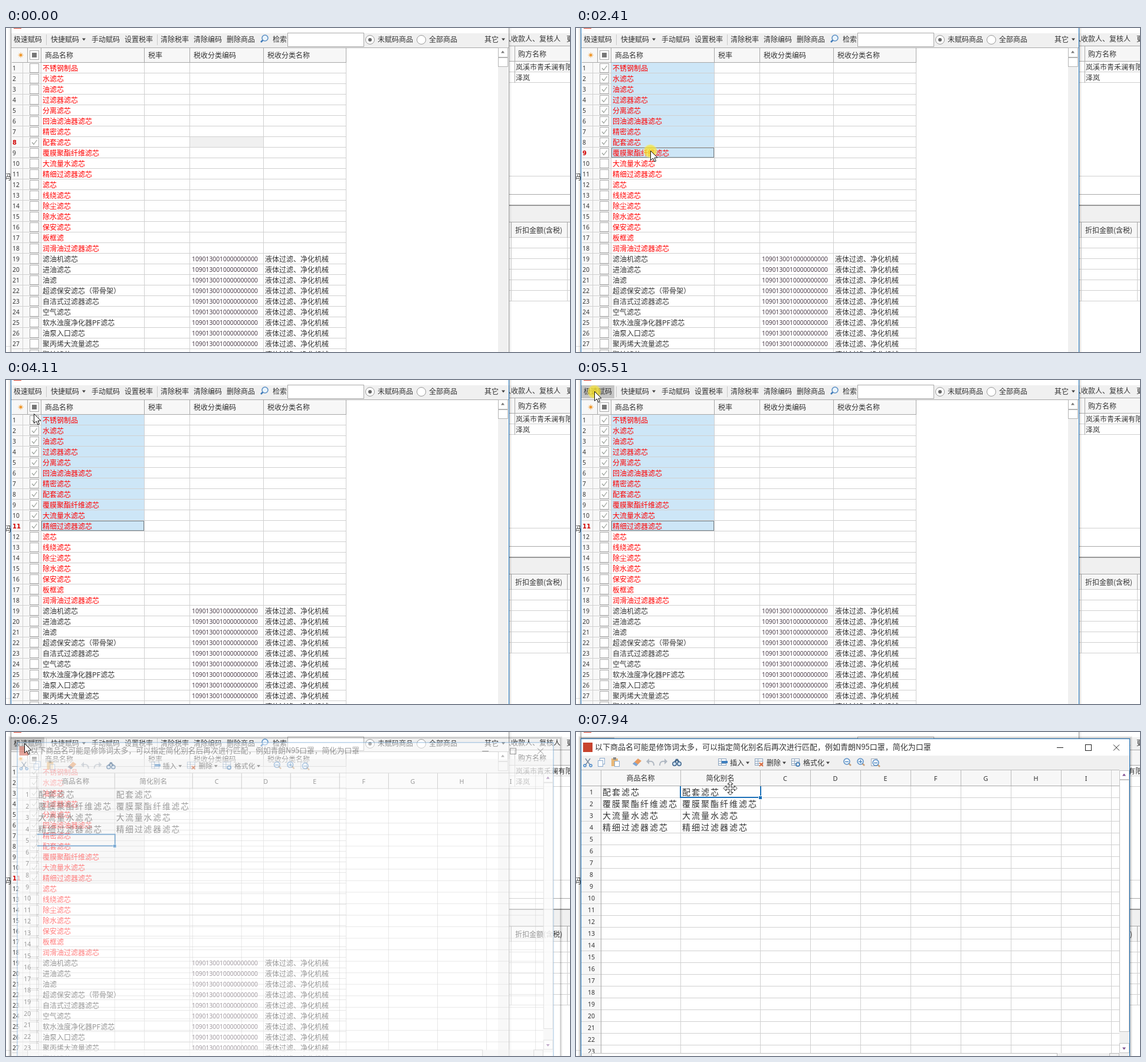
An HTML page with a canvas that plays this animation: 956 by 550 pixels, repeating every 8000 ms.

```html
<!DOCTYPE html>
<html lang="zh">
<head>
<meta charset="utf-8">
<style>
html, body { margin: 0; width: 100%; height: 100%; overflow: hidden; background: #fff; }
canvas { display: block; }
</style>
</head>
<body>
<canvas id="stage" width="956" height="550"></canvas>
<script>
const ctx = document.getElementById('stage').getContext('2d');
const LOOP = 8000;
const CJK = '"Noto Sans CJK SC", "Noto Sans CJK", sans-serif';
const LATIN = '"Noto Sans", sans-serif';
const BLUE = '#1c70b8';
const LINE = '#d0d0d0';
const EDGE = '#a8a8a8';
const INK = '#333';

const goods = ('不锈钢制品 水滤芯 油滤芯 过滤器滤芯 分离滤芯 回油滤油器滤芯 精密滤芯 配套滤芯 覆膜聚酯纤维滤芯 ' +
  '大流量水滤芯 精细过滤器滤芯 滤芯 线绕滤芯 除尘滤芯 除水滤芯 保安滤芯 板框滤 润滑油过滤器滤芯 滤油机滤芯 ' +
  '进油滤芯 油滤 超滤保安滤芯（带骨架） 自洁式过滤器滤芯 空气滤芯 软水浊度净化器PF滤芯 油泵入口滤芯 ' +
  '聚丙烯大流量滤芯 聚结滤芯').split(' ');

// start, end, steps, from, to, ease-out power
const moves = [
  [510, 1200, 11, [862, 537], [120, 77], 2],
  [1330, 1400, 2, [120, 74], [120, 71], 1],
  [1600, 1601, 2, [120, 69], [120, 69], 1],
  [1870, 2410, 9, [120, 69], [126, 208], 1],
  [2480, 2630, 3, [126, 214], [126, 227], 1],
  [2700, 2830, 3, [126, 230], [126, 236], 1],
  [3290, 3430, 3, [126, 238], [126, 243], 1],
  [3760, 4110, 6, [126, 243], [47, 57], 1],
  [4170, 4380, 4, [43, 46], [31, 19], 1.5],
  [6690, 7120, 7, [33, 20], [284, 120], 1.3],
  [7190, 7470, 5, [278, 112], [261, 95], 1.5]
];

function stepAt(t, start, end, count) {
  const k = Math.floor((t - start) / ((end - start) / (count - 1)) + 0.25);
  return Math.max(0, Math.min(count - 1, k));
}

function pointerAt(t) {
  const move = moves.filter(m => t >= m[0]).pop();
  if (!move) return null;
  const [start, end, count, from, to, power] = move;
  const p = 1 - Math.pow(1 - stepAt(t, start, end, count) / (count - 1), power);
  return from.map((v, i) => Math.round(v + (to[i] - v) * p));
}

function box(x, y, w, h, color) {
  ctx.fillStyle = color;
  ctx.fillRect(x, y, w, h);
}
const hline = (x1, x2, y, color = LINE) => box(x1, y, x2 - x1, 1, color);
const vline = (x, y1, y2, color = LINE) => box(x, y1, 1, y2 - y1, color);

function frame(x, y, w, h, color, width = 1) {
  ctx.strokeStyle = color;
  ctx.lineWidth = width;
  ctx.strokeRect(x + 0.5, y + 0.5, w - 1, h - 1);
}

// Baselines sit on whole pixels to keep small text crisp.
function text(str, x, cy, { size = 12, color = INK, font = CJK, align = 'left', bold = false, gap = 0 } = {}) {
  ctx.font = `${bold ? 'bold ' : ''}${size}px ${font}`;
  ctx.letterSpacing = gap + 'px';
  ctx.textAlign = align;
  ctx.fillStyle = color;
  ctx.fillText(str, x, Math.round(cy + size * 0.42));
}

function path(points, { fill, stroke, width = 1, close = false } = {}) {
  ctx.beginPath();
  points.forEach(([x, y]) => ctx.lineTo(x, y));
  if (close) ctx.closePath();
  if (fill) { ctx.fillStyle = fill; ctx.fill(); }
  if (stroke) { ctx.strokeStyle = stroke; ctx.lineWidth = width; ctx.stroke(); }
}

function ring(x, y, r, { fill, stroke, width = 1 }) {
  ctx.beginPath();
  ctx.arc(x, y, r, 0, 7);
  if (fill) { ctx.fillStyle = fill; ctx.fill(); }
  if (stroke) { ctx.strokeStyle = stroke; ctx.lineWidth = width; ctx.stroke(); }
}

function triangle(x, y, r = 3, color = '#444', dir = 1) {
  path([[x - r, y - dir * r / 2], [x + r, y - dir * r / 2], [x, y + dir * r / 2 + dir]], { fill: color, close: true });
}

function shadow(x, y, w, h, strength) {
  for (let i = 1; i < 5; i++) frame(x - i, y - i, w + 2 * i, h + 2 * i, `rgba(0,0,0,${strength * (1 - i / 5)})`);
}

function magnifier(x, y, sign) {
  path([[x + 2, y + 2], [x + 7, y + 7]], { stroke: sign ? '#c9a27c' : '#3c78b8', width: 2.5 });
  ring(x, y, 5, { fill: '#eaf4fd', stroke: '#5b8fc4', width: 1.5 });
  if (sign) hline(x - 3, x + 3, y, '#2f6fb0');
  if (sign === '+') vline(x, y - 3, y + 3, '#2f6fb0');
}

function drawBackWindow() {
  box(0, 0, 956, 550, '#fff');
  text('码', -4, 252, { size: 13 });
  hline(0, 8, 540, '#ddd');
  box(853, 9, 103, 22, '#f0f0f0');
  text('入收款人、复核人', 844, 18);
  text('更', 950, 18);
  box(853, 31, 103, 26, '#f6f6f6');
  [30, 56].forEach(y => hline(853, 956, y, EDGE));
  [74, 92, 251].forEach(y => hline(853, 956, y));
  hline(853, 956, 282, EDGE);
  vline(862, 31, 93, EDGE);
  text('购方名称', 868, 44);
  text('岚溪市青禾澜有限', 864, 66);
  text('泽岚', 864, 84);
  box(853, 300, 103, 2, '#999');
  box(853, 302, 103, 28, '#f0f0f0');
  box(853, 330, 103, 26, '#f6f6f6');
  hline(853, 956, 329, EDGE);
  for (let y = 355; y < 470; y += 18) hline(853, 956, y);
  [856, 951].forEach(x => {
    vline(x, 330, 464);
    vline(x, 330, 356, EDGE);
  });
  text('折扣金额(含税)', 863, 343);
}

function radio(x, on) {
  ring(x, 20, 7.5, { fill: '#fff', stroke: '#999' });
  if (on) ring(x, 20, 3, { fill: '#666' });
}

function drawToolbar(hover) {
  box(9, 9, 843, 24, '#f0f0f0');
  if (hover) box(9, 9, 56, 22, '#c4c4c4');
  [['极速赋码', 13], ['快捷赋码', 76], ['手动赋码', 145], ['设置税率', 201], ['清除税率', 262], ['清除编码', 318],
    ['删除商品', 374], ['检索', 452], ['未赋码商品', 630], ['全部商品', 717], ['其它', 811]]
    .forEach(([label, x]) => text(label, x, 19));
  [68, 256].forEach(x => vline(x, 11, 29, '#c8c8c8'));
  [132, 843].forEach(x => triangle(x, 19));
  ctx.save();
  ctx.translate(876, 0);
  ctx.scale(-1, 1);
  magnifier(437, 17);
  ctx.restore();
  box(477, 8, 130, 24, '#fff');
  frame(477, 8, 130, 24, '#aaa');
  radio(617, true);
  radio(704, false);
}

function checkBox(cy, on) {
  box(40, cy - 8, 16, 16, '#fff');
  frame(40, cy - 8, 16, 16, '#aaa');
  if (on) path([[44, cy], [47, cy + 3.5], [52.5, cy - 4]], { stroke: '#9aa09a', width: 1.2 });
}

function drawGoods(selected, active) {
  box(9, 33, 843, 517, '#fff');
  box(10, 34, 567, 25, '#f7f7f7');
  box(10, 59, 49, 491, '#f8f8f8');
  [['商品名称', 66], ['税率', 241], ['税收分类编码', 318], ['税收分类名称', 443]]
    .forEach(([label, x]) => text(label, x, 46));
  for (let i = 0; i < 8; i++) {
    const c = Math.cos(i * Math.PI / 4), s = Math.sin(i * Math.PI / 4);
    path([[25, 46], [25 + 4.5 * c, 46 + 4.5 * s]], { stroke: '#f0a850' });
  }
  ring(25, 46, 2.3, { fill: '#f09a30' });
  checkBox(46, false);
  box(44, 42, 8, 8, '#777');

  const current = selected || 8;
  if (selected) box(60, 59, 174, 18 * selected, active ? '#cde6f7' : '#f0f0f0');
  else box(312, 185, 124, 17, '#f0f0f0');
  for (let y = 76; y < 550; y += 18) hline(10, 577, y);
  [28, 59, 234, 311, 436, 576].forEach(x => vline(x, 59, 550));
  [36, 59, 234, 311, 436, 576].forEach(x => vline(x, 34, 59, EDGE));
  hline(9, 852, 33, EDGE);
  hline(10, 577, 58, EDGE);

  goods.forEach((name, i) => {
    const row = i + 1, cy = 68 + 18 * i;
    const here = row === current;
    text(row, 11, cy, here
      ? { size: 10, color: '#d00000', font: '"DejaVu Sans", sans-serif', bold: true }
      : { size: 10.3, font: LATIN });
    checkBox(cy, selected ? row <= selected : here);
    text(name, 62, cy, { color: row < 19 ? '#f00' : INK });
    if (row > 18) {
      text('1090130010000000000', 315, cy, { size: 10.3, color: '#4a3b48', font: LATIN });
      text('液体过滤、净化机械', 439, cy);
    }
  });
  if (selected && active) {
    ctx.setLineDash([1, 1]);
    frame(60, 59 + 18 * (selected - 1), 174, 17, '#222');
    ctx.setLineDash([]);
  }

  box(834, 34, 17, 516, '#f0f0f0');
  [[33, 17], [50, 16]].forEach(([y, h]) => {
    box(834, y, 17, h, '#fff');
    frame(834, y, 17, h, '#b4b4b4');
  });
  triangle(842, 41, 3, '#777', -1);
}

function drawMainWindow(selected, active, hover) {
  shadow(8, -10, 845, 580, active ? 0.2 : 0.12);
  box(8, 0, 845, 550, '#fff');
  box(13, -12, 13, 13, '#d8402c');
  drawToolbar(hover);
  drawGoods(selected, active);
  const edge = active ? BLUE : '#999';
  vline(8, 0, 550, edge);
  vline(852, 0, 550, edge);
}

function drawDialogIcons() {
  path([[16, 45], [24, 56]], { stroke: '#7a8ba0', width: 1.5 });
  path([[24, 45], [16, 56]], { stroke: '#7a8ba0', width: 1.5 });
  ring(15, 57, 2, { stroke: '#4a88c8', width: 1.5 });
  ring(25, 57, 2, { stroke: '#4a88c8', width: 1.5 });
  [[40, 44], [37, 48]].forEach(([x, y]) => {
    box(x, y, 9, 11, '#fff');
    frame(x, y, 9, 11, '#8aa9cc');
  });
  box(60, 45, 11, 13, '#e8b878');
  box(63, 43, 5, 4, '#888');
  box(65, 49, 9, 10, '#fff');
  frame(65, 49, 9, 10, '#8aa9cc');
  path([[96, 54], [105, 45], [111, 49], [102, 58]], { fill: '#e89a60', close: true });
  path([[96, 54], [99, 51], [105, 55], [102, 58]], { fill: '#7aa8dc', close: true });
  [[126, 1], [148, -1]].forEach(([x, d]) => {
    path([[x - 7 * d, 50], [x - 2 * d, 45], [x - 2 * d, 55]], { fill: '#b0b8c2', close: true });
    ctx.beginPath();
    ctx.moveTo(x - 3 * d, 50);
    ctx.quadraticCurveTo(x + 6 * d, 48, x + 6 * d, 57);
    ctx.strokeStyle = '#b0b8c2';
    ctx.lineWidth = 2;
    ctx.stroke();
  });
  [167, 175].forEach(x => {
    path([[x, 52], [171, 46]], { stroke: '#44698f', width: 3 });
    ring(x, 54, 3.2, { fill: '#cfe2f5', stroke: '#44698f', width: 1.5 });
  });
  [241, 303, 365].forEach((x, i) => {
    box(x, 45, 14, 12, '#fff');
    frame(x, 45, 14, 12, '#8aa2bd');
    [49, 53].forEach(y => hline(x, x + 14, y, '#8aa2bd'));
    vline(x + 5, 45, 57, '#8aa2bd');
    if (i === 0) box(x + 6, 49, 10, 4, '#3d7fc0');
    if (i === 1) {
      path([[x + 8, 52], [x + 14, 58]], { stroke: '#e07040', width: 2 });
      path([[x + 14, 52], [x + 8, 58]], { stroke: '#e07040', width: 2 });
    }
    if (i === 2) ring(x + 11, 55, 3, { fill: '#fff', stroke: '#4a80b5', width: 2 });
  });
  [['插入', 261, 291], ['删除', 323, 353], ['格式化', 385, 427]].forEach(([label, x, arrow]) => {
    text(label, x, 52);
    triangle(arrow, 52);
  });
  magnifier(459, 50, '-');
  magnifier(482, 50, '+');
  box(500, 45, 11, 13, '#fff');
  frame(500, 45, 11, 13, '#9aa8b8');
  magnifier(508, 52, '-');
}

function drawDialogFrame() {
  box(8, 11, 931, 565, '#fff');
  box(12, 18, 16, 16, '#c8442f');
  text('以下商品名可能是修饰词太多，可以指定简化别名后再次进行匹配，例如青朗N95口罩，简化为口罩', 32, 25, { size: 13 });
  hline(815, 826, 26, '#222');
  frame(863, 21, 11, 11, '#222');
  path([[911, 21.5], [921, 31.5]], { stroke: '#222' });
  path([[921, 21.5], [911, 31.5]], { stroke: '#222' });
  box(9, 40, 929, 25, '#f0f0f0');
  drawDialogIcons();
  frame(8, 11, 931, 565, BLUE);
}

function drawSheet(picked) {
  const columns = [42, 177, 312, 397, 482, 567, 652, 737, 822, 907];
  box(9, 65, 912, 26, '#f7f7f7');
  box(9, 91, 33, 480, '#f7f7f7');
  for (let y = 111; y < 550; y += 20) hline(9, 921, y);
  columns.forEach(x => vline(x, 65, 546, x === 42 ? '#aaa' : LINE));
  columns.slice(0, -1).forEach((x, i) => {
    vline(x, 65, 91, '#bbb');
    const mid = (x + columns[i + 1]) / 2;
    if (i < 2) text(['商品名称', '简化别名'][i], mid, 78, { align: 'center' });
    else text(String.fromCharCode(65 + i), mid, 78, { size: 11, font: LATIN, align: 'center' });
  });
  hline(9, 921, 64, '#bbb');
  hline(9, 921, 91, '#aaa');
  for (let row = 1; row <= 23; row++) {
    text(row, 26, 82 + 20 * row, { size: 10.5, font: LATIN, align: 'center' });
  }
  goods.slice(7, 11).forEach((name, i) => [45, 180].forEach(x => text(name, x, 101 + 20 * i, { size: 14, gap: 2 })));

  const [sx, sy] = picked ? [177, 91] : [42, 171];
  ctx.save();
  ctx.beginPath();
  ctx.rect(43, 92, 878, 460);
  ctx.clip();
  ctx.strokeStyle = BLUE;
  ctx.lineWidth = 2;
  ctx.strokeRect(sx, sy, 136, 20);
  box(sx + 132, sy + 17, 7, 7, '#fff');
  box(sx + 133, sy + 18, 5, 5, BLUE);
  ctx.restore();

  box(921, 65, 17, 485, '#f0f0f0');
  [[65, 16], [81, 428], [528, 17]].forEach(([y, h]) => {
    box(921, y, 17, h, '#fff');
    frame(921, y, 17, h, '#c4c4c4');
  });
  triangle(929, 73, 3, '#805090', -1);
  triangle(929, 537, 3, '#805090');
  box(9, 545, 912, 20, '#f0f0f0');
  box(26, 545, 790, 20, '#fff');
  frame(26, 545, 790, 20, '#bbb');
  frame(904, 545, 17, 20, '#bbb');
}

// The dialog grows while fading in; its sheet is painted after the frame.
function drawDialog(p, picked) {
  const scale = 0.92 + 0.08 * p;
  shadow(8, 11, 931, 565, 0.1 + 0.15 * Math.min(1, p * 2));
  ctx.save();
  ctx.globalAlpha = Math.pow(p, 2.2);
  ctx.translate(474, 290);
  ctx.scale(scale, scale);
  ctx.translate(-474, -290);
  drawDialogFrame();
  if (p > 0.5) drawSheet(picked);
  ctx.restore();
}

function drawArrow(x, y) {
  const shape = [[0, 0], [0, 16], [4, 12.5], [6.5, 18.5], [9, 17.5], [6.5, 11.7], [11.5, 11.5]];
  path(shape.map(([a, b]) => [x + 0.5 + a, y + 0.5 + b]), { fill: '#fff', stroke: '#111', close: true });
}

function drawMoveCross(x, y) {
  const arm = [[-1.5, -1.5], [-1.5, -7], [-4.5, -7], [0, -11.5], [4.5, -7], [1.5, -7]];
  const shape = [];
  for (let q = 0; q < 4; q++) {
    const c = Math.round(Math.cos(q * Math.PI / 2)), s = Math.round(Math.sin(q * Math.PI / 2));
    arm.forEach(([a, b]) => shape.push([x + 0.5 + a * c - b * s, y + 0.5 + a * s + b * c]));
  }
  path(shape, { fill: '#fff', stroke: '#222', close: true });
}

function drawPress(x, y) {
  const glow = ctx.createRadialGradient(x, y, 0, x, y, 12);
  glow.addColorStop(0, 'rgba(250,225,30,.8)');
  glow.addColorStop(0.8, 'rgba(250,230,50,.7)');
  glow.addColorStop(1, 'rgba(255,240,120,.15)');
  ring(x, y, 12, { fill: glow });
}

const within = (t, a, b) => t >= a && t < b;

function draw(t) {
  const pointer = pointerAt(t);
  let selected = 0;
  if (t >= 3430) selected = 11;
  else if (t >= 1870) selected = Math.floor((pointer[1] - 59) / 18) + 1;
  const hover = t >= 4170 && (t > 5440 || pointer[1] < 32);

  drawBackWindow();
  drawMainWindow(selected, within(t, 1870, 5580), hover);
  if (t >= 5970) drawDialog((stepAt(t, 5970, 6360, 7) + 1) / 7, t >= 7870);

  if (!pointer) return;
  const [x, y] = pointer;
  if (within(t, 1870, 3760) || within(t, 5440, 5580) || within(t, 7870, 7940)) drawPress(x, y + 1);
  if (t >= 6690 && y > 91) drawMoveCross(x, y);
  else drawArrow(x, y);
}

function tick() {
  draw(performance.now() % LOOP);
  requestAnimationFrame(tick);
}
tick();
</script>
</body>
</html>
```
